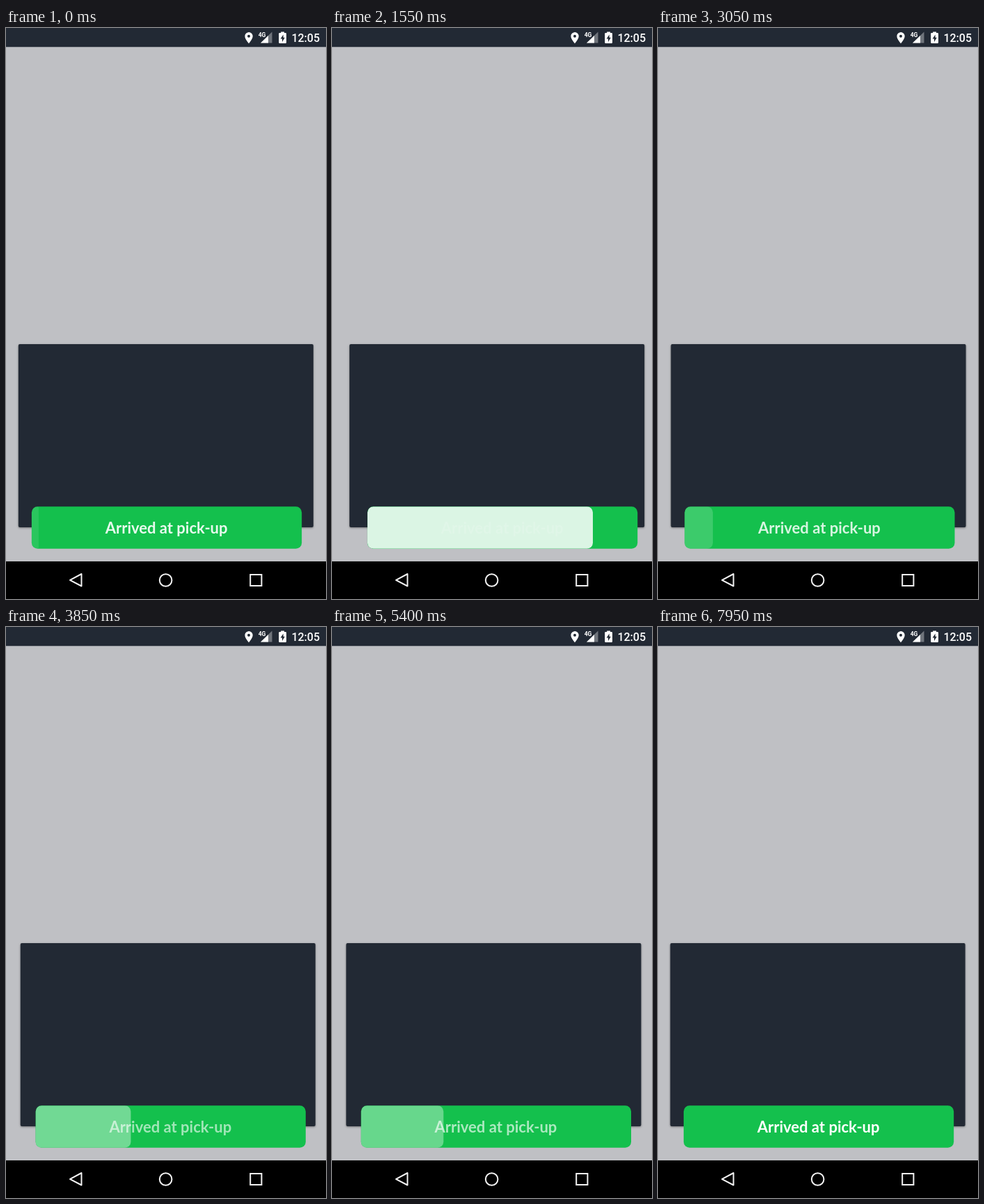
These frames come from a looping animation (460 px wide and 820 px high, 8000 ms). An HTML page with a canvas:

```html
<!DOCTYPE html>
<html lang="en">
<head>
<meta charset="utf-8">
<title>Swipe button</title>
<style>
  html, body { margin: 0; width: 100%; height: 100%; overflow: hidden; background: #bfc0c4; }
  canvas { display: block; width: 460px; height: 820px; }
</style>
</head>
<body>
<canvas id="stage"></canvas>
<script>
const W = 460, H = 820, LOOP = 8000, STEP = 50;
const DARK = '#222934', GREEN = '#14c04d', WHITE = '#ffffff';
const canvas = document.getElementById('stage');
const ctx = canvas.getContext('2d');
const ratio = window.devicePixelRatio || 1;
canvas.width = W * ratio;
canvas.height = H * ratio;

const clamp = (v, lo, hi) => Math.min(hi, Math.max(lo, v));
const ramp = (t, start, end) => clamp((t - start) / (end - start), 0, 1);
const easeIn = u => u ** 1.5;
const easeOut = u => 1 - (1 - u) ** 1.4;
const backIn = u => 2.7 * u ** 3 - 1.7 * u ** 2;

// Share of the button that is swiped: right, back, right again, released
function swipe(t) {
  const p = 0.026
    + 0.939 * ramp(t, 0, 1800)
    - 0.935 * ramp(t, 1900, 3150)
    + 0.97 * easeIn(ramp(t, 3250, 4500))
    - easeOut(ramp(t, 4800, 5850));
  return p < 0.001 ? 0 : p;
}

// Hint: the button alone backs up, springs to the right and settles
function nudge(t) {
  return 17.5 * (backIn(ramp(t, 6850, 7350)) - easeOut(ramp(t, 7350, 8000)));
}

function box(x, y, w, h, r, fill) {
  ctx.beginPath();
  ctx.roundRect(x, y, w, h, r);
  ctx.fillStyle = fill;
  ctx.fill();
}

function poly(points, fill) {
  ctx.beginPath();
  points.forEach(([x, y]) => ctx.lineTo(x, y));
  ctx.closePath();
  if (fill) {
    ctx.fillStyle = fill;
    ctx.fill();
  }
}

function text(str, x, y, font, align) {
  ctx.font = font;
  ctx.textAlign = align;
  ctx.fillStyle = WHITE;
  ctx.fillText(str, x, y);
}

function locationPin(x, y) {
  ctx.beginPath();
  ctx.arc(x, y, 5.7, Math.PI * 0.9, Math.PI * 0.1);
  ctx.quadraticCurveTo(x + 4.5, y + 5.2, x, y + 10.4);
  ctx.quadraticCurveTo(x - 4.5, y + 5.2, x - 5.4, y + 1.8);
  ctx.closePath();
  ctx.fillStyle = WHITE;
  ctx.fill();
  ctx.beginPath();
  ctx.arc(x, y, 2, 0, Math.PI * 2);
  ctx.fillStyle = DARK;
  ctx.fill();
}

function signal() {
  poly([[366, 21.5], [382.5, 21.5], [382.5, 5.5]], '#70757c');
  poly([[366, 21.5], [377, 21.5], [377, 11]], WHITE);
  box(362, 5, 11.5, 9, 0, DARK);
  text('4G', 362.7, 13, 'bold 8.5px "Roboto", sans-serif', 'left');
}

function battery() {
  box(395.2, 5.5, 4.8, 3, 0, WHITE);
  box(392.2, 7, 10.8, 15, 1.2, WHITE);
  poly([[398.6, 9.5], [394.6, 15.5], [397, 15.5], [397, 20], [400.8, 13.8], [398.6, 13.8]], DARK);
}

function statusBar() {
  box(0, 0, W, 27.3, 0, DARK);
  locationPin(349, 11.8);
  signal();
  battery();
  text('12:05', 451, 20, '500 16px "Roboto", sans-serif', 'right');
}

function navBar() {
  box(0, 766, W, H - 766, 0, '#000000');
  ctx.strokeStyle = '#f2f2f2';
  ctx.lineWidth = 2;
  ctx.lineJoin = 'round';
  poly([[108.5, 784], [108.5, 801.5], [92, 792.8]]);
  ctx.stroke();
  ctx.beginPath();
  ctx.arc(229.6, 793, 8.8, 0, Math.PI * 2);
  ctx.stroke();
  ctx.lineJoin = 'miter';
  ctx.strokeRect(351.2, 785, 16.2, 16);
}

function card(x) {
  ctx.save();
  ctx.shadowColor = 'rgba(0, 0, 0, 0.4)';
  ctx.shadowBlur = 3 * ratio;
  ctx.shadowOffsetY = ratio;
  box(x, 454, 424, 263, 2, DARK);
  ctx.restore();
}

function button(x, p) {
  const y = 687.2, w = 388.3, h = 60.6, r = 8.5;
  const fade = p && Math.min(1, 0.07 + 0.93 * p);
  box(x, y, w, h, r, GREEN);
  ctx.save();
  ctx.clip();
  ctx.globalAlpha = fade;
  box(x, y, p * w, h, Math.min(r, p * w / 4), WHITE);
  ctx.restore();
  ctx.globalAlpha = 1 - fade;
  text('Arrived at pick-up', x + w / 2 - 0.4, 726, 'bold 22px "Lato", sans-serif', 'center');
  ctx.globalAlpha = 1;
}

function draw(t) {
  const p = swipe(t);
  ctx.setTransform(ratio, 0, 0, ratio, 0, 0);
  box(0, 0, W, H, 0, '#bfc0c4');
  card(17.6 + 9 * p);
  button(36.4 + 17.4 * p + nudge(t), p);
  statusBar();
  navBar();
}

const start = performance.now();
function tick() {
  const t = (performance.now() - start) % LOOP;
  draw(Math.floor(t / STEP) * STEP);
  requestAnimationFrame(tick);
}
tick();
</script>
</body>
</html>
```
